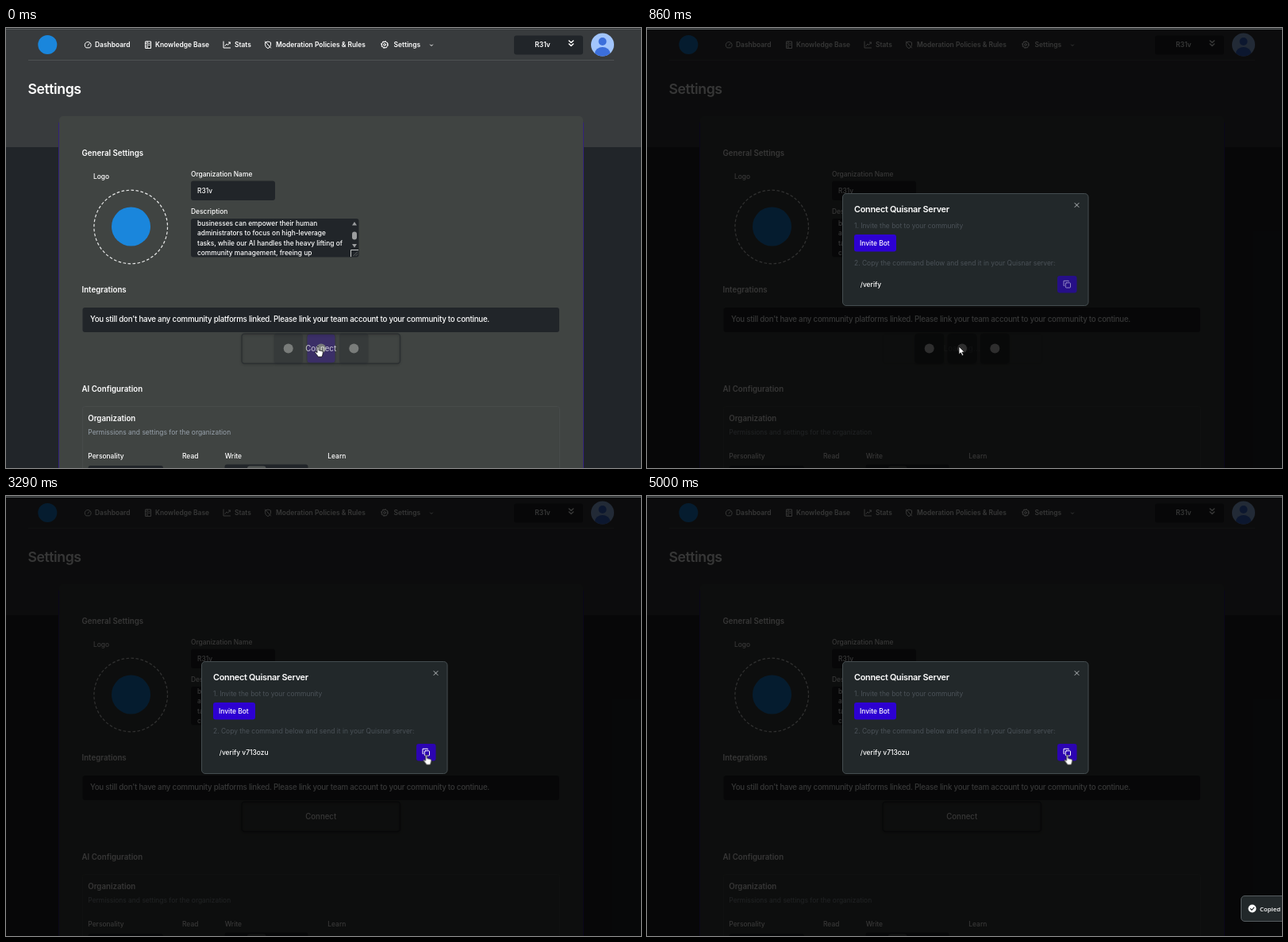
Write an HTML page that moves like this. It is 800x554 px and loops after 5140 ms.

```html
<!DOCTYPE html>
<html lang="en">
<head>
<meta charset="utf-8">
<title>Settings</title>
<style>
html, body { margin: 0; width: 100%; height: 100%; overflow: hidden; background: #212529; }
svg { display: block; width: 100%; height: 100%; }
text { font: 500 8.45px Inter, "Open Sans", sans-serif; fill: #fff; white-space: pre; }
.nav text { font-weight: 600; }
.field { font-size: 8.35px; }
.h1 { font-size: 17.7px; font-weight: 600; letter-spacing: -.025em; }
.h2 { font-size: 9.7px; font-weight: 600; }
.h3 { font-size: 10.85px; font-weight: 600; letter-spacing: -.025em; }
.alert { font-size: 9.72px; letter-spacing: -.025em; }
.btn { font-size: 9.65px; text-anchor: middle; }
.muted { font-weight: 400; fill: #97a1ab; }
.faint { font-weight: 400; fill: #4b5258; }
.toast { font: 600 7.8px "Open Sans", "Noto Sans", sans-serif; }
.dark { fill: #212529; }
.line { fill: none; stroke: #fff; stroke-width: 1; stroke-linecap: round; stroke-linejoin: round; }
.bold { stroke-width: 1.5; }
.close { stroke: #b9bdbf; }
.tick { stroke: #22282a; stroke-width: 1.2; }
.box { fill: none; stroke: #212529; stroke-width: 1.4; }
.glow { filter: blur(.7px); }
.lift { filter: drop-shadow(0 1px 1.5px rgb(0 0 0 / .35)); }

/* One 5140 ms loop; every change is a hard step. */
.a { animation: 5140ms step-end infinite; }
#connect { animation-name: connect; }
#loading { animation-name: loading; }
#apps { animation-name: apps; }
#hot { animation-name: hot; }
#overlay, #modal { animation-name: open; }
#code { animation-name: code; }
#copy { animation-name: copy; }
#copyIcon { animation-name: copyIcon; }
#toast { animation-name: toast; }
#pointer { animation-name: move; }
#hand { animation-name: hand; }
#arrow { animation-name: arrow; }

@keyframes connect {
  0% { opacity: .65 } 2.72% { opacity: .25 } 5.63% { opacity: 0 }
  44.54% { opacity: .6 } 52.71% { opacity: .85 } 55.63%, 100% { opacity: 1 }
}
@keyframes loading {
  0% { opacity: 0 } 16.72% { opacity: .15 } 19.45% { opacity: .35 }
  22.17% { opacity: .5 } 44.54%, 100% { opacity: 0 }
}
@keyframes apps {
  0% { opacity: .3 } 2.72% { opacity: .75 } 5.63% { opacity: 1 }
  16.72% { opacity: .8 } 19.45% { opacity: .35 } 22.17%, 100% { opacity: 0 }
}
@keyframes hot { 0% { fill: #3000be } 16.72%, 100% { fill: #212529 } }
@keyframes open { 0% { visibility: hidden } 16.72%, 100% { visibility: visible } }
@keyframes code { 0% { visibility: hidden } 44.54%, 100% { visibility: inherit } }
@keyframes copy { 0% { fill: #260f88 } 49.99% { fill: #2c01c6 } 64%, 100% { fill: #2c04b2 } }
@keyframes copyIcon { 0% { opacity: .5 } 49.99%, 100% { opacity: 1 } }
@keyframes toast {
  0% { transform: translateX(60px) } 66.72% { transform: translateX(30px) }
  69.45% { transform: translateX(8px) } 72.17%, 100% { transform: none }
}
@keyframes move {
  0% { transform: translate(393px, 401px) }
  25.09% { transform: translate(394px, 401px) }
  38.91% { transform: translate(403px, 397px) }
  41.63% { transform: translate(433px, 381px) }
  44.54% { transform: translate(479px, 355px) }
  47.27% { transform: translate(515px, 335px) }
  49.99%, 100% { transform: translate(529.5px, 325.5px) }
}
@keyframes hand {
  0% { visibility: visible } 16.72% { visibility: hidden } 49.99%, 100% { visibility: visible }
}
@keyframes arrow {
  0% { visibility: hidden } 16.72% { visibility: visible } 49.99%, 100% { visibility: hidden }
}
</style>
</head>
<body>
<svg viewBox="0 0 800 554" preserveAspectRatio="none">
  <rect class="dark" width="800" height="554"/>
  <rect width="800" height="150" fill="#383b3d"/>
  <rect x="28" y="40" width="738" height="1" fill="#4d5152"/>

  <g class="nav">
    <circle cx="52.3" cy="21" r="12" fill="#1a86dc"/>
    <g class="line">
      <path d="M100.6 24.6a4 4 0 1 1 5.2 0zM103 22l2-2.4"/>
      <path d="M176 17h6.5v8.5h-6.5zM178 17v8.5M179.8 19.5h1.2M179.8 21.5h1.2M175.3 19.5h1M175.3 23h1"/>
      <path d="M274 17v8h8.5M276 22.5l2-2.5 1.5 1.5 2.8-3.5M280.5 18h1.8v1.8"/>
      <path d="M327 18l3-1 3.5 1.2v3q0 3-3.5 4.5-3.5-1.5-3.5-4.5zM326.5 17l7 8"/>
      <circle cx="477" cy="21" r="3.7"/><circle cx="477" cy="21" r="1.4"/>
      <circle cx="477" cy="21" r="4.3" stroke-dasharray="1.4 1.977"/>
      <path d="M534.5 21l1.5 1.5 1.5-1.5"/>
    </g>
    <text x="112" y="24">Dashboard</text>
    <text x="188" y="24">Knowledge Base</text>
    <text x="288" y="24">Stats</text>
    <text x="340" y="24">Moderation Policies &amp; Rules</text>
    <text x="488.5" y="24">Settings</text>
    <rect class="dark" x="640" y="9.5" width="87" height="24" rx="3"/>
    <text x="676" y="24" text-anchor="middle">R31v</text>
    <path class="line bold" d="M709.3 16l2.7 2.5 2.7-2.5M709.3 20l2.7 2.5 2.7-2.5"/>
    <clipPath id="face"><circle cx="751.5" cy="21" r="14.5"/></clipPath>
    <g clip-path="url(#face)">
      <rect x="736" y="6" width="31" height="30" fill="#a2c5fc"/>
      <g fill="#3c6fdb"><circle cx="751.5" cy="17" r="5"/><ellipse cx="751.5" cy="31.5" rx="9.5" ry="7.5"/></g>
    </g>
  </g>
  <text class="h1" x="27.5" y="82.5">Settings</text>

  <rect class="glow" x="66" y="116" width="662" height="450" rx="5" fill="#33227c"/>
  <rect x="67" y="111" width="660" height="460" rx="5" fill="#404442"/>

  <text class="h2" x="95.5" y="161">General Settings</text>
  <text x="110" y="190">Logo</text>
  <circle cx="157.2" cy="250.5" r="46.3" fill="none" stroke="#e8e9e9" stroke-width="1.2" stroke-dasharray="3.6 2.46"/>
  <circle cx="157.5" cy="250" r="24.5" fill="#1a86dc"/>
  <text x="233" y="186.5">Organization Name</text>
  <rect class="dark" x="233" y="192.5" width="106" height="24.5" rx="3"/>
  <text class="field" x="241" y="208">R31v</text>
  <text x="233" y="234">Description</text>
  <rect class="dark" x="233" y="240" width="211.5" height="48.5" rx="3"/>
  <text class="field" x="241" y="249.2">businesses can empower their human</text>
  <text class="field" x="241" y="261.4">administrators to focus on high-leverage</text>
  <text class="field" x="241" y="273.6">tasks, while our AI handles the heavy lifting of</text>
  <text class="field" x="241" y="285.8">community management, freeing up</text>
  <g fill="#9b9d9e">
    <path d="M436 248.5l3-4.5 3 4.5zM436 272l3 4.5 3-4.5z"/>
    <rect x="436" y="256.5" width="6" height="10" rx="3"/>
  </g>
  <path d="M434.5 288v-8.5h9.5" fill="none" stroke="#c4c6c6"/>
  <path d="M437.5 287l5.5-5.5M440.5 287l2.5-2.5" fill="none" stroke="#777b7c" stroke-width=".7"/>

  <text class="h2" x="95.5" y="333">Integrations</text>
  <rect class="dark" x="96.5" y="352" width="600.5" height="31" rx="3"/>
  <text class="alert" x="106" y="370">You still don't have any community platforms linked. Please link your team account to your community to continue.</text>

  <g id="apps" class="a">
    <g class="lift dark">
      <rect x="337.5" y="384.5" width="36.5" height="38" rx="4"/>
      <rect id="hot" class="a" x="379" y="385" width="36" height="37" rx="4" stroke="#212529"/>
      <rect x="420" y="384.5" width="36.5" height="38" rx="4"/>
    </g>
    <g fill="#fff">
      <circle cx="355.7" cy="403.5" r="6"/><circle cx="397" cy="403.5" r="6"/><circle cx="438.3" cy="403.5" r="6"/>
    </g>
  </g>
  <g id="connect" class="a">
    <rect class="box lift" x="297" y="385" width="199.5" height="37.5" rx="3.5"/>
    <text class="btn" x="396.7" y="407">Connect</text>
  </g>
  <g id="loading" class="a">
    <rect class="box" x="297" y="385" width="201" height="37.5" rx="3.5"/>
    <text class="btn" x="396.7" y="407">Loading...</text>
  </g>

  <text class="h2" x="95.5" y="458">AI Configuration</text>
  <rect x="96.5" y="476.5" width="601" height="90" rx="3" fill="none" stroke="#474b4a"/>
  <text class="h2" x="103.3" y="495.2">Organization</text>
  <text class="muted" x="103.3" y="511.5">Permissions and settings for the organization</text>
  <text x="103.3" y="542.3">Personality</text>
  <text x="222" y="542.3">Read</text>
  <text x="275.7" y="542.3">Write</text>
  <text x="405.3" y="542.3">Learn</text>
  <rect class="dark" x="103.5" y="551" width="94.5" height="20" rx="3"/>
  <rect class="dark" x="275.5" y="549.5" width="105" height="20" rx="3"/>
  <rect x="304" y="551.5" width="23.5" height="10" rx="3" fill="#505453"/>

  <rect id="overlay" class="a" y="2" width="800" height="552" fill-opacity=".79"/>
  <rect width="800" height="1" fill="#2b2e2f"/>
  <rect y="1" width="800" height="1" fill="#565a5b"/>

  <g id="modal" class="a">
    <rect x="246.5" y="208.5" width="309.5" height="141" rx="4.5" fill="#22282a" stroke="#454d50"/>
    <text class="h3" x="261" y="232">Connect Quisnar Server</text>
    <path class="line close" d="M539 220.5l5 5M544 220.5l-5 5"/>
    <text class="faint" x="261" y="251.5">1. Invite the bot to your community</text>
    <rect x="261" y="260" width="53" height="21.5" rx="3" fill="#2d00d2"/>
    <text x="268" y="273.5">Invite Bot</text>
    <text class="faint" x="261" y="299">2. Copy the command below and send it in your Quisnar server:</text>
    <text x="268.8" y="326">/verify<tspan id="code" class="a"> v713ozu</tspan></text>
    <rect id="copy" class="a" x="517" y="312" width="24.5" height="21.5" rx="3"/>
    <g id="copyIcon" class="line a">
      <rect x="527.3" y="320.8" width="6.2" height="6.2" rx="1"/>
      <path d="M525.5 324.5h-.5v-6.2h6.2v.7"/>
    </g>
  </g>

  <g id="toast" class="a">
    <rect x="748.5" y="503.5" width="70" height="32" rx="4.5" fill="#22282a" stroke="#565d60"/>
    <circle cx="762.5" cy="519.5" r="5" fill="#fff"/>
    <path class="line tick" d="M760.3 519.7l1.6 1.6 2.9-3.2"/>
    <text class="toast" x="772" y="522.6">Copied</text>
  </g>

  <g id="pointer" class="a" fill="#fff" stroke="#111" stroke-width=".8" stroke-linejoin="round">
    <path id="arrow" class="a" d="M0 0v9.8l2.3-2 1.7 3.7 1.7-.8-1.7-3.6h3z"/>
    <path id="hand" class="a" d="M-1 .8q1-1.3 2 0v4l4.2.9q1.3.4 1.2 1.9l-.6 3.4-.8 2h-4.8l-1.4-2.3-2.5-3.2q.2-1.4 1.5-.7l1.2 1z"/>
  </g>
</svg>
</body>
</html>
```
